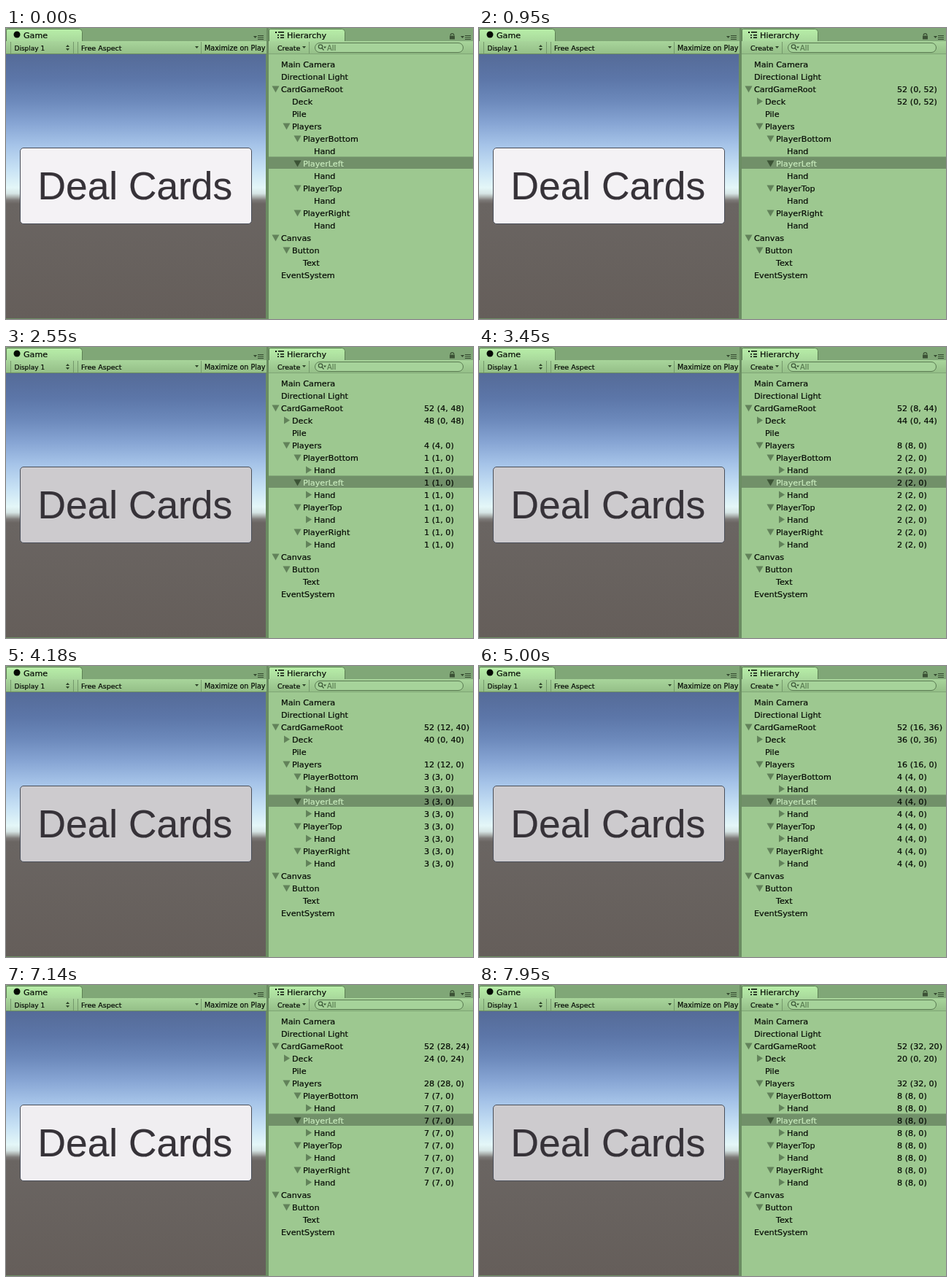
These frames come from a looping animation (640x399 px, 8 s). An HTML page with a canvas:

```html
<!DOCTYPE html>
<html lang="en">
<head>
<meta charset="utf-8">
<title>Deal Cards</title>
<style>
  html, body { margin: 0; width: 100%; height: 100%; overflow: hidden; background: #9dc890; }
  canvas { display: block; }
</style>
</head>
<body>
<canvas id="stage" width="640" height="399"></canvas>
<script>
const ctx = document.getElementById('stage').getContext('2d');
const LOOP = 8000, PRESS = 390, FADE = 100;
const UI = '"DejaVu Sans", sans-serif';
const INK = '#050a04';

// Button releases: the first builds the deck, each later one deals a card to every player.
const releases = [600, 1790, 2600, 3500, 4280, 5060, 6010, 6800, 7520, 8200];

// [label, depth, arrow, count group]
const rows = [
  ['Main Camera', 0], ['Directional Light', 0],
  ['CardGameRoot', 0, 'open', 'root'],
  ['Deck', 1, 'deck', 'deck'], ['Pile', 1], ['Players', 1, 'open', 'players'],
  ...['Bottom', 'Left', 'Top', 'Right'].flatMap(side => [
    ['Player' + side, 2, 'open', 'hand'], ['Hand', 3, 'hand', 'hand']]),
  ['Canvas', 0, 'open'], ['Button', 1, 'open'], ['Text', 2], ['EventSystem', 0]
];
const SELECTED = 8;

const clamp = v => Math.max(0, Math.min(1, v));

function box(x, y, w, h, fill) {
  ctx.fillStyle = fill;
  ctx.fillRect(x, y, w, h);
}

function shape(points, fill) {
  ctx.beginPath();
  points.forEach(([x, y]) => ctx.lineTo(x, y));
  ctx.closePath();
  ctx.fillStyle = fill;
  ctx.fill();
}

function rounded(x, y, w, h, r, fill, stroke) {
  ctx.beginPath();
  ctx.roundRect(x, y, w, h, r);
  ctx.fillStyle = fill;
  ctx.fill();
  ctx.strokeStyle = stroke;
  ctx.lineWidth = 1;
  ctx.stroke();
}

// A hairline stroke gives the interface labels their slightly heavier stems.
function text(str, x, y, size, color = INK, family = UI) {
  ctx.font = `${size}px ${family}`;
  ctx.fillStyle = ctx.strokeStyle = color;
  ctx.lineWidth = 0.2;
  ctx.fillText(str, x, y);
  ctx.strokeText(str, x, y);
}

function gradient(y0, y1, stops) {
  const g = ctx.createLinearGradient(0, y0, 0, y1);
  stops.forEach(([y, color]) => g.addColorStop((y - y0) / (y1 - y0), color));
  return g;
}

const barFill = gradient(18, 36, [[18, '#a8d59b'], [36, '#94be87']]);
const tabFill = gradient(0, 18, [[0, '#b9f0a9'], [18, '#a9d99c']]);
const skyFill = gradient(36, 399, [
  [36, '#556b98'], [70, '#5c76a8'], [100, '#6c89bb'], [130, '#86a4d3'],
  [160, '#a5c3e8'], [195, '#c9e3f5'], [219, '#e4f7f8'], [227, '#d6e5e5'],
  [232, '#a9aeac'], [236, '#7d7a78'], [241, '#6a6562'], [399, '#655e5a']
]);

function tab(x, right) {
  ctx.beginPath();
  ctx.roundRect(x + 0.5, 1.5, right - x - 1, 20, [2, 4, 0, 0]);
  ctx.fillStyle = tabFill;
  ctx.fill();
  ctx.strokeStyle = '#5d8054';
  ctx.lineWidth = 1;
  ctx.stroke();
}

function panelMenu(x) {
  shape([[x, 11], [x + 5, 11], [x + 2.5, 14]], '#33482e');
  for (let i = 0; i < 3; i++) box(x + 6, 10 + i * 2.5, 8, 1, '#33482e');
}

function dropdown(x) {
  shape([[x, 25], [x + 5, 25], [x + 2.5, 28]], '#2c4027');
}

function drawGame(press) {
  box(0, 0, 357, 18, '#80a777');
  tab(0, 105);
  ctx.beginPath();
  ctx.arc(15, 9, 4.5, 0, Math.PI * 2);
  ctx.fillStyle = INK;
  ctx.fill();
  text('Game', 24, 14, 11.1);
  panelMenu(339);

  box(0, 18, 357, 18, barFill);
  for (const x of [6, 92, 98, 267]) box(x, 19, 1, 16, '#75996c');
  box(0, 35, 357, 1, '#6b8d62');
  text('Display 1', 11.5, 31, 9);
  shape([[82, 26], [87, 26], [84.5, 23]], '#2c4027');
  shape([[82, 28], [87, 28], [84.5, 31]], '#2c4027');
  text('Free Aspect', 103, 31, 9.5);
  dropdown(259);
  ctx.save();
  ctx.beginPath();
  ctx.rect(0, 18, 356, 18);
  ctx.clip();
  text('Maximize on Play', 272, 31, 9.6);
  ctx.restore();

  box(0, 36, 356, 362, skyFill);
  const shade = Math.round(244 - 39 * press);
  rounded(19.5, 164.5, 317, 104, 4.5, `rgb(${shade},${shade - 2},${shade + 1})`, '#4a4f5a');
  text('Deal Cards', 43.5, 235, 53.3, '#363238', '"Liberation Sans", Arial, sans-serif');
}

function drawHierarchyBar() {
  box(360, 0, 280, 18, '#80a777');
  tab(360, 465);
  box(369, 5, 2, 2, INK);
  box(373, 5, 8, 1.5, INK);
  for (const y of [9, 12.5]) {
    box(372, y, 2, 1.5, INK);
    box(376, y, 5, 1.5, INK);
  }
  text('Hierarchy', 385, 14, 11.2);

  ctx.strokeStyle = '#3c5236';
  ctx.lineWidth = 1.3;
  ctx.beginPath();
  ctx.arc(611.5, 10, 2.3, Math.PI, 0);
  ctx.stroke();
  box(608, 10.5, 7, 5, '#3c5236');
  panelMenu(623);

  box(360, 18, 280, 18, barFill);
  box(360, 35, 280, 1, '#7fa675');
  text('Create', 372, 31, 9.4);
  dropdown(406);
  box(415, 19, 1, 16, '#75996c');
  rounded(423.5, 20.5, 203, 13, 6.5, '#a6d39a', '#587850');
  ctx.strokeStyle = '#3c5737';
  ctx.lineWidth = 1.2;
  ctx.beginPath();
  ctx.arc(431, 25.5, 2.7, 0, Math.PI * 2);
  ctx.moveTo(433, 27.5);
  ctx.lineTo(435.5, 30.5);
  ctx.stroke();
  shape([[435, 25.5], [439, 25.5], [437, 28]], '#3c5737');
  text('All', 440, 30.5, 9.8, '#57794f');
}

function arrow(x, y, open, color) {
  shape(open
    ? [[x - 5, y - 4], [x + 5, y - 4], [x, y + 5]]
    : [[x - 3.5, y - 5], [x + 4.5, y], [x - 3.5, y + 5]], color);
}

function drawTree(hasDeck, dealt) {
  const total = dealt * 4, left = 52 - total;
  const label = (down, up) => `${down + up} (${down}, ${up})`;
  const counts = {};
  if (hasDeck) {
    counts.root = label(total, left);
    counts.deck = label(0, left);
  }
  if (dealt) {
    counts.players = label(total, 0);
    counts.hand = label(dealt, 0);
  }

  box(360, 36, 280, 363, '#9dc890');
  rows.forEach(([name, depth, kind, group], i) => {
    const x = 377 + depth * 15, y = 50 + i * 17, selected = i === SELECTED;
    if (selected) box(360, 176.5, 280, 16.5, '#719069');
    const hasArrow = kind === 'open' || kind === 'deck' && hasDeck || kind === 'hand' && dealt;
    if (hasArrow) arrow(x - 7.5, y - 0.5, kind === 'open', selected ? '#3c5436' : '#62825a');
    text(name, x, y + 4, 11.2, selected ? '#c9ecbe' : INK);
    if (counts[group]) text(counts[group], 573, y + 3.5, 11.2);
  });
}

function draw(t) {
  const done = releases.filter(r => r <= t).length;
  const press = releases.reduce((sum, r) =>
    sum + clamp((t - r + PRESS) / FADE) - clamp((t - r) / FADE), 0);
  box(0, 0, 640, 399, '#6b8d62');
  drawGame(press);
  drawHierarchyBar();
  drawTree(done > 0, Math.max(0, done - 1));
}

const start = performance.now();
function frame() {
  draw((performance.now() - start) % LOOP);
  requestAnimationFrame(frame);
}
frame();
</script>
</body>
</html>
```
